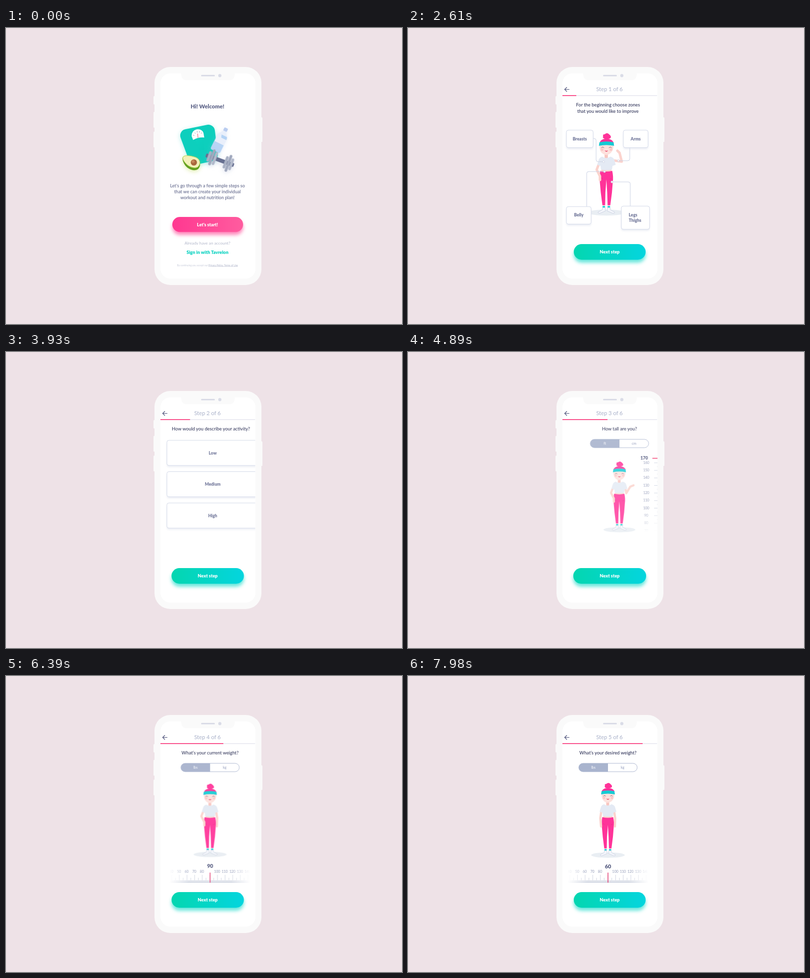
An HTML page for the animation above (8 s loop, 800 px wide and 600 px high).

```html
<!DOCTYPE html>
<html lang="en">
<head>
<meta charset="utf-8">
<title>Fitness onboarding</title>
<style>
html, body { margin: 0; width: 100%; height: 100%; overflow: hidden; background: #eee2e7; }
svg { display: block; width: 100vw; height: 100vh; font-family: Lato, "Open Sans", sans-serif; }
.mid { text-anchor: middle; }
.title { font-size: 9.3px; font-weight: 500; fill: #2f3358; text-anchor: middle; }
.num { font-size: 7px; fill: #8f97b5; text-anchor: middle; }
.value { font-weight: 900; fill: #565c80; text-anchor: middle; }
.label { font-size: 8.5px; font-weight: 900; fill: #71779a; }
.button { font-weight: 900; fill: #fff; text-anchor: middle; }
.card { fill: #fff; stroke: #d3d9e8; filter: drop-shadow(0 3px 1.5px #dfe3ee88); }
.wire { fill: none; stroke: #cbd2e4; }
.tick { stroke: #c6ccdb; stroke-width: .8; fill: none; }
.skin { fill: none; stroke: #fbd3cd; stroke-width: 4.6; stroke-linecap: round; stroke-linejoin: round; }
.step { font-size: 11.2px; fill: #a9b1c9; text-anchor: middle; }
</style>
</head>
<body>
<svg viewBox="0 0 800 600">
  <defs>
    <linearGradient id="pink"><stop stop-color="#ff3890"/><stop offset="1" stop-color="#ff5c9f"/></linearGradient>
    <linearGradient id="green"><stop stop-color="#04d6b0"/><stop offset="1" stop-color="#04d5de"/></linearGradient>
    <linearGradient id="teal" x2="1" y2="1"><stop stop-color="#0cd6c2"/><stop offset="1" stop-color="#0cc9b8"/></linearGradient>
    <linearGradient id="fadeX">
      <stop stop-color="#000"/><stop offset=".24" stop-color="#fff"/>
      <stop offset=".76" stop-color="#fff"/><stop offset="1" stop-color="#000"/>
    </linearGradient>
    <linearGradient id="fadeY" x2="0" y2="1">
      <stop offset=".7" stop-color="#fff"/><stop offset="1" stop-color="#000"/>
    </linearGradient>
    <mask id="maskX" maskUnits="userSpaceOnUse" x="-82" y="385" width="164" height="40">
      <rect x="-82" y="385" width="164" height="40" fill="url(#fadeX)"/>
    </mask>
    <mask id="maskY" maskUnits="userSpaceOnUse" x="40" y="205" width="60" height="161">
      <rect x="40" y="205" width="60" height="161" fill="url(#fadeY)"/>
    </mask>
    <clipPath id="screen"><rect x="312" y="92" width="191.5" height="416" rx="20"/></clipPath>
  </defs>

  <rect width="800" height="600" fill="#eee2e7"/>
  <g fill="#fafafa">
    <rect x="298" y="138" width="6" height="17" rx="1.5"/>
    <rect x="298" y="170" width="6" height="32" rx="1.5"/>
    <rect x="298" y="210" width="6" height="32" rx="1.5"/>
    <rect x="512" y="181" width="6" height="50" rx="1.5"/>
    <rect x="300" y="79" width="216" height="442" rx="32"/>
  </g>
  <rect x="312" y="92" width="192" height="416" rx="20" fill="#fff"/>
  <path d="M352 91H464Q462 92 462 95Q461 106 450 106H366Q355 106 354 95Q354 92 352 91Z" fill="#fafafa"/>
  <rect x="394" y="95" width="28" height="3" rx="1.5" fill="#dadce7"/>
  <circle cx="432" cy="96.5" r="3.2" fill="#dadce7"/>

  <g clip-path="url(#screen)">
    <g id="header">
      <path d="M326 124.500H316.500M321 120L316.500 124.500L321 129" fill="none" stroke="#4d527a" stroke-width="1.2"/>
      <text class="step" x="407" y="128">Step <tspan id="digit"></tspan> of 6</text>
      <text class="step" x="407" y="128"><tspan fill="none">Step </tspan><tspan id="nextDigit"></tspan><tspan fill="none"> of 6</tspan></text>
      <path d="M312 137H503.500" stroke="#e4e6ee" stroke-width="1.5"/>
      <rect id="bar" x="312" y="136" height="2" fill="#f9568f"/>
    </g>
    <g id="pages"></g>
    <g id="next">
      <rect id="nextShape" y="438" height="31.700" rx="15.850" fill="url(#green)" style="filter:drop-shadow(0 6px 3.5px #10d8c8a0)"/>
      <text class="button" x="407.500" y="457" font-size="9.200">Next step</text>
    </g>
  </g>
</svg>
<script>
const LOOP = 8000, SLIDE = 720, PITCH = 195, REST = 404;
const SLIDES = [1860, 3496, 4541, 5939, 7259];
const $ = id => document.getElementById(id);
const clamp = v => Math.max(0, Math.min(1, v));
const range = (n, make) => Array.from({ length: n }, (_, i) => make(i)).join('');
const text = (x, y, body, cls = 'mid', more = '') => `<text x="${x}" y="${y}" class="${cls}" ${more}>${body}</text>`;
const rect = (x, y, w, h, r, more) => `<rect x="${x}" y="${y}" width="${w}" height="${h}" rx="${r}" ${more}/>`;
const path = (d, more) => `<path d="${d}" ${more}/>`;
const card = (x, y, w, h) => rect(x, y, w, h, 4, 'class="card"');
const title = body => text(0, 159, body, 'title');

const ARMS = {
  down: ['M391 271L388.500 288L390 305', 'M416 271L418.500 288L418 305'],
  hip: 'M391 271L386 284L392 296V303',
  flex: 'M417 267L432 269L428 253L424 249',
  offer: 'M416 271L418.500 285L427 271L434 268'
};

function girl(y, size, left, right, x = 0) {
  const foot = side => `<g transform="translate(403.700 0) scale(${side} 1)">
    ${rect(2.6, 348, 4, 9, 0, 'fill="#fbe6e3"')}
    ${path('M2 354H7L7.500 358L15 362Q16 364.500 12 364.500L1.500 360Z', 'fill="#f4f6fb" stroke="#c8cfe0" stroke-width=".8"')}
    ${rect(2.3, 351, 4.6, 2.6, 0, 'fill="#19cbd5"')}</g>`;
  return `<g class="girl" data-x="${x}" data-y="${y}" data-size="${size}"><g transform="translate(-404 -292)">
    <ellipse cx="404" cy="363" rx="34" ry="5.500" fill="#e9eef3"/>
    ${foot(1)}${foot(-1)}
    ${rect(394.5, 280, 18.5, 9, 2, 'fill="#fbd3cd"')}
    ${path('M392.500 286Q404 289 414.500 286Q417 297 415.500 307L414 326L411 349.500H406L405.300 326L403.800 302L402 326L401.500 349.500H396.500L393.500 326L391.800 307Q390.500 296 392.500 286Z', 'fill="#ff3399"')}
    ${path('M394 299L397 301M413 300L410 302', 'stroke="#e02580" stroke-width=".6"')}
    ${path(left, 'class="skin"')}${path(right, 'class="skin"')}
    ${rect(400.5, 253, 6, 11, 3, 'fill="#f8c6c0"')}
    ${path('M396 260Q403.500 265 411 260Q416 261 418 265L421 275L415 277L414 284Q404 286 394 284L393 277L387 275L390 265Q392 261 396 260Z', 'fill="#e4eaf4"')}
    ${path('M398 222Q396 219 401 218.500Q405 215 409 219Q414 223 411 226Q405 229 400 227Q396 225 398 222Z', 'fill="#ff3399"')}
    ${path('M391 237Q390 255 403.500 257Q417.500 255 417 237Z', 'fill="#fde1dd"')}
    ${path('M391 235Q393 227 404 227Q415 227 417.500 235Z', 'fill="#ff3399"')}
    ${path('M391 233.500Q404 230.500 417 233.500L418 240Q404 237 390 240Z', 'fill="#16cbd4"')}
    <circle cx="396" cy="247" r="2.500" fill="#fbc8c8"/><circle cx="412" cy="247" r="2.500" fill="#fbc8c8"/>
    ${path('M394.500 244Q397 240.500 399.500 244M408.500 244Q411 240.500 413.500 244', 'fill="none" stroke="#6b4c63" stroke-width=".8"')}
    ${path('M400.500 248.500Q404 250 407 248.500Q404 253 400.500 248.500Z', 'fill="#e83a62"')}
  </g></g>`;
}

const toggle = (a, b) => rect(-59, 177, 118, 17, 8.5, 'fill="#fff" stroke="#aeb8d1"')
  + path('M0 177H-50.500A8.500 8.500 0 0 0 -50.500 194H0Z', 'fill="#a9b4ce"')
  + text(-29.5, 187.5, a, 'mid', 'font-size="7" fill="#fff"')
  + text(29.5, 187.5, b, 'mid', 'font-size="7" fill="#8c96b8"');

function heightRuler() {
  const ticks = range(101, i => {
    const start = i % 10 === 0 ? 70 : i % 5 === 0 ? 76 : 81;
    return `M${start} ${(215.500 + (i + 6) * 1.53).toFixed(2)}H86`;
  });
  return `<g mask="url(#maskY)">${path('M86 215V366' + ticks, 'class="tick"')}
    ${range(11, i => text(54, 226.800 + i * 15.3, 160 - i * 10, 'num'))}</g>
    ${path('M66.500 215.500H86', 'stroke="#f4527f" stroke-width="1.800"')}
    ${text(50, 218.3, 170, 'value', 'font-size="8.500"')}`;
}

function weightRuler(value) {
  const ticks = range(111, i => {
    const start = i % 10 === 5 ? 403 : i % 5 === 0 ? 409 : 414;
    return `M${((i - 55) * 1.54).toFixed(2)} ${start}V418`;
  });
  const labels = range(11, i => i === 5 ? '' : text((i - 5) * 15.4 - .7, 398.5, 40 + i * 10, 'num'));
  return `<g class="ruler"><g mask="url(#maskX)">${path(ticks, 'class="tick"')}
      ${rect(-82, 417.8, 164, 1, 0, 'fill="#bfc6d6"')}${labels}</g></g>
    ${path('M0 398.500V419', 'stroke="#e84d7f" stroke-width="1.600"')}
    <g class="weight">${text(0, 4, value, 'value', 'font-size="11"')}</g>`;
}

function illustration() {
  const plate = (x, h, color) => rect(x - 2.7, -h / 2, 5.4, h, 2.7, `fill="${color}"`);
  return `<g style="filter:drop-shadow(0 2px 5px #16d2c055)">
      ${path('M365 218L409 209L415 257L382 264Z', 'fill="url(#teal)" stroke="#0dcfbd" stroke-width="26" stroke-linejoin="round"')}</g>
    ${path('M375 219Q375 208 385 205.500Q396 204 399 213L400.500 222Q388 221 378 227Z', 'fill="#fff"')}
    ${path('M378 217L380.500 218M381 212L383 214M386 209L386.500 212M391 209L390.500 212M395.500 212L394 214', 'stroke="#8a93a8" stroke-width=".9"')}
    ${path('M387 214L388 222.500', 'stroke="#f0506e" stroke-width="1"')}
    <g transform="translate(433 228) rotate(26)" style="filter:drop-shadow(0 2px 4px #9fb6e844)">
      ${rect(-4, -28, 8, 7, 1.5, 'fill="#b9ccf0"')}
      ${path('M-4 -21H4Q4 -17 8 -14Q11 -11 10.500 -6V21Q10.500 24 7 24H-7Q-10.500 24 -10.500 21V-6Q-11 -11 -8 -14Q-4 -17 -4 -21Z', 'fill="#e9effb"')}
      ${path('M-3 -12H9Q11 -9 10.500 -6H-1Z', 'fill="#b4d3f5"')}
      ${path('M-10.500 6H10.500V21Q10.500 24 7 24H-7Q-10.500 24 -10.500 21Z', 'fill="#b7d4f5"')}
    </g>
    <g transform="translate(432 268) rotate(20)" style="filter:drop-shadow(0 3px 4px #8f9ac844)">
      ${rect(-30, -4, 60, 8, 2, 'fill="#677091"')}
      ${plate(-23, 22, '#a9b1c4')}${plate(-17, 34, '#a1a9be')}${plate(-10.5, 28, '#b2b9cb')}
      ${plate(12.5, 26, '#a9b1c4')}${plate(18.5, 36, '#a1a9be')}${plate(24.5, 25, '#b2b9cb')}
    </g>
    <g style="filter:drop-shadow(0 3px 4px #b8d84466)">
      ${path('M358 261C362 257 374 259 383 263C393 267 395 279 388 286C379 292 366 285 361 277C357 270 355 264 358 261Z', 'fill="#63a01f"')}
      ${path('M358 261C362 257 374 259 383 262C393 266 394 276 387 282C379 286 367 280 362 273C358 268 356 264 358 261Z', 'fill="#f3f1b9" stroke="#b7d65b"')}
      <circle cx="379.500" cy="272.500" r="6.300" fill="#a9673c"/><circle cx="378" cy="270.500" r="3" fill="#c58657"/>
    </g>`;
}

const welcome = `<g transform="translate(-${REST} 0)">
  ${text(407, 163, 'Hi! Welcome!', 'mid', 'font-size="11.200" font-weight="900" fill="#60668a"')}
  ${illustration()}
  ${["Let's go through a few simple steps so", 'that we can create your individual', 'workout and nutrition plan!']
    .map((line, i) => text(407, 322.5 + i * 12.3, line, 'mid', 'font-size="9.100" font-weight="500" fill="#60668a"')).join('')}
  ${rect(336, 383, 143, 30.5, 15.25, 'fill="url(#pink)" style="filter:drop-shadow(0 6px 3.5px #ff4c9aa8)"')}
  ${text(407, 401.5, "Let's start!", 'button', 'font-size="9"')}
  ${text(407, 439, 'Already have an account?', 'mid', 'font-size="8.300" fill="#b3b8cb"')}
  ${text(407, 458, 'Sign in with Tavrelon', 'mid', 'font-size="9.100" font-weight="900" fill="#05d1bf"')}
  ${text(407, 482.5, 'By continuing you accept our <tspan text-decoration="underline" fill="#aab0c6">Privacy Policy, Terms of Use</tspan>', 'mid', 'font-size="4.900" fill="#c5c9d8"')}
</g>`;

const zones = title('For the beginning choose zones') + text(0, 171.5, 'that you would like to improve', 'title')
  + girl(296, 1.1, ARMS.hip, ARMS.flex, -3)
  + `<g transform="translate(-389 0)">
    ${path('M359 224H361Q365 224 365 228V267Q365 271 369 271H380M433 243V265Q433 269 429 269H410M346 362V295Q346 291 350 291H382M434 361V316Q434 312 430 312H397', 'class="wire"')}
    ${[[380, 271], [410, 269], [382, 291], [397, 312]].map(([x, y]) =>
      `<circle cx="${x}" cy="${y}" r="2" fill="#fff" stroke="#cfd5e6"/>`).join('')}
    ${card(305, 207, 54, 35.5)}${card(420, 207, 50, 35.5)}${card(305, 362, 50, 35.5)}${card(416, 361, 57, 47)}
    ${text(332, 227.5, 'Breasts', 'label mid')}${text(445, 227.5, 'Arms', 'label mid')}
    ${text(330, 382, 'Belly', 'label mid')}${text(431, 381.5, 'Legs', 'label')}${text(431, 393, 'Thighs', 'label')}
  </g>`;

const activity = title('How would you describe your activity?')
  + ['Low', 'Medium', 'High'].map((name, i) =>
    card(-89, 179 + i * 63.5, 185.5, 51) + text(3.5, 207.5 + i * 63.5, name, 'label mid')).join('');

const height = title('How tall are you?') + toggle('ft', 'cm') + girl(293, 1, ARMS.hip, ARMS.offer) + heightRuler();

const weight = (name, value, left) => title(`What’s your ${name} weight?`) + toggle('lbs', 'kg')
  + girl(292, 1, left, ARMS.down[1]) + weightRuler(value);

$('pages').innerHTML = [welcome, zones, activity, height,
  weight('current', 90, ARMS.hip), weight('desired', 60, ARMS.down[0])].map(body => `<g>${body}</g>`).join('');

const pages = [...$('pages').children].map(el => ({
  el, girl: el.querySelector('.girl'), ruler: el.querySelector('.ruler'), weight: el.querySelector('.weight')
}));

function placePage({ el, girl, ruler, weight }, offset) {
  const far = Math.abs(offset), incoming = clamp(offset);
  el.style.display = far < 1.25 ? '' : 'none';
  el.setAttribute('transform', `translate(${REST + offset * PITCH} 0)`);
  // Leaving pages hold their colour at first, arriving ones fade in evenly.
  el.setAttribute('opacity', offset < 0 ? clamp(1 - 3.3 * far * far) : 1 - .8 * incoming);
  if (girl) {
    const { x, y, size } = girl.dataset;
    girl.setAttribute('transform', `translate(${x} ${y}) scale(${size * (1 - .45 * clamp(far))})`);
    girl.setAttribute('opacity', 1 - .8 * incoming);
  }
  if (ruler) ruler.setAttribute('transform', `translate(${-offset * PITCH * .06} 0)`);
  if (weight) weight.setAttribute('transform', `translate(0 385.500) scale(${1 - clamp(far)})`);
}

function draw(t) {
  let step = 0, pulse = 0;
  for (const start of SLIDES) {
    step += 1 - Math.pow(1 - clamp((t - start) / SLIDE), 3.2);
    const x = Math.max(0, t - start) / 110;
    pulse += x * Math.exp(1 - x);
  }
  pages.forEach((page, i) => placePage(page, i - step));

  const shown = clamp(step), current = Math.max(1, Math.floor(step));
  const mix = clamp((step - current - .33) / .3);
  $('header').setAttribute('opacity', shown);
  $('next').setAttribute('opacity', shown);
  $('digit').textContent = current;
  $('digit').setAttribute('fill-opacity', 1 - mix);
  $('nextDigit').textContent = current + 1;
  $('nextDigit').setAttribute('fill-opacity', mix);
  $('bar').setAttribute('width', Math.max(0, 28 + 33.5 * (step - 1)));

  const width = 145 + 6 * pulse;
  $('nextShape').setAttribute('x', 407.5 - width / 2);
  $('nextShape').setAttribute('width', width);
}

function tick() {
  draw(performance.now() % LOOP);
  requestAnimationFrame(tick);
}
tick();
</script>
</body>
</html>
```
